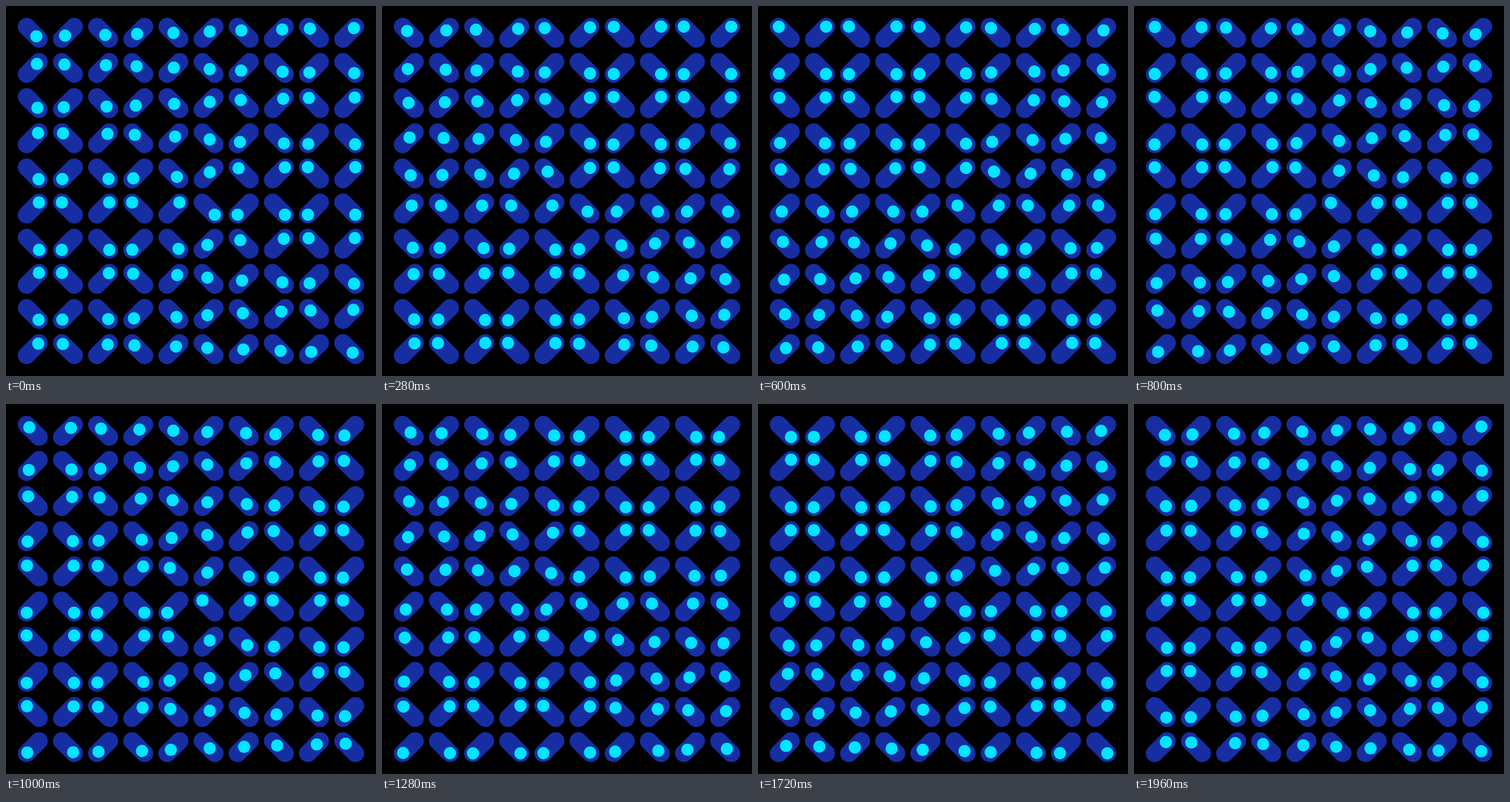
An HTML page with a canvas that plays this animation: 500x500 px, repeating every 2000 ms.

```html
<!DOCTYPE html>
<html>
<head>
<meta charset="utf-8">
<style>
html, body { margin: 0; width: 100%; height: 100%; overflow: hidden; background: #000; }
canvas { display: block; }
</style>
</head>
<body>
<canvas width="500" height="500"></canvas>
<script>
const ctx = document.querySelector('canvas').getContext('2d');
const COUNT = 10, MID = 5, CELL = 47.5, MARGIN = 12.5;
const LOOP = 2000, STEP = 40, LEAD = 60;
const RADIUS = CELL / 4, REACH = RADIUS / Math.SQRT2, DOT = RADIUS * 0.7;

const centre = n => MARGIN + CELL * (n + 0.5);

function drawCell(col, row, phase) {
  const x = centre(col), y = centre(row);
  const flipX = col % 2 ? -1 : 1, flipY = row % 2 ? -1 : 1;
  const dx = REACH * flipX, dy = REACH * flipY;

  ctx.beginPath();
  ctx.moveTo(x - dx, y - dy);
  ctx.lineTo(x + dx, y + dy);
  ctx.stroke();

  // Each dot's phase follows its direction from the middle cell.
  const swing = -Math.cos(Math.atan2(row - MID, col - MID) + phase);
  ctx.beginPath();
  ctx.arc(x + dx * swing, y + dy * swing, DOT, 0, 2 * Math.PI);
  ctx.fill();
}

const start = performance.now();

function draw() {
  const elapsed = (performance.now() - start) % LOOP;
  const time = Math.floor(elapsed / STEP) * STEP;
  const phase = 2 * Math.PI * (time + LEAD) / LOOP;

  ctx.fillStyle = '#000';
  ctx.fillRect(0, 0, 500, 500);
  ctx.strokeStyle = '#172da2';
  ctx.fillStyle = '#00e5ff';
  ctx.lineWidth = 2 * RADIUS;
  ctx.lineCap = 'round';
  for (let row = 0; row < COUNT; row++)
    for (let col = 0; col < COUNT; col++) drawCell(col, row, phase);
  requestAnimationFrame(draw);
}
draw();
</script>
</body>
</html>
```
